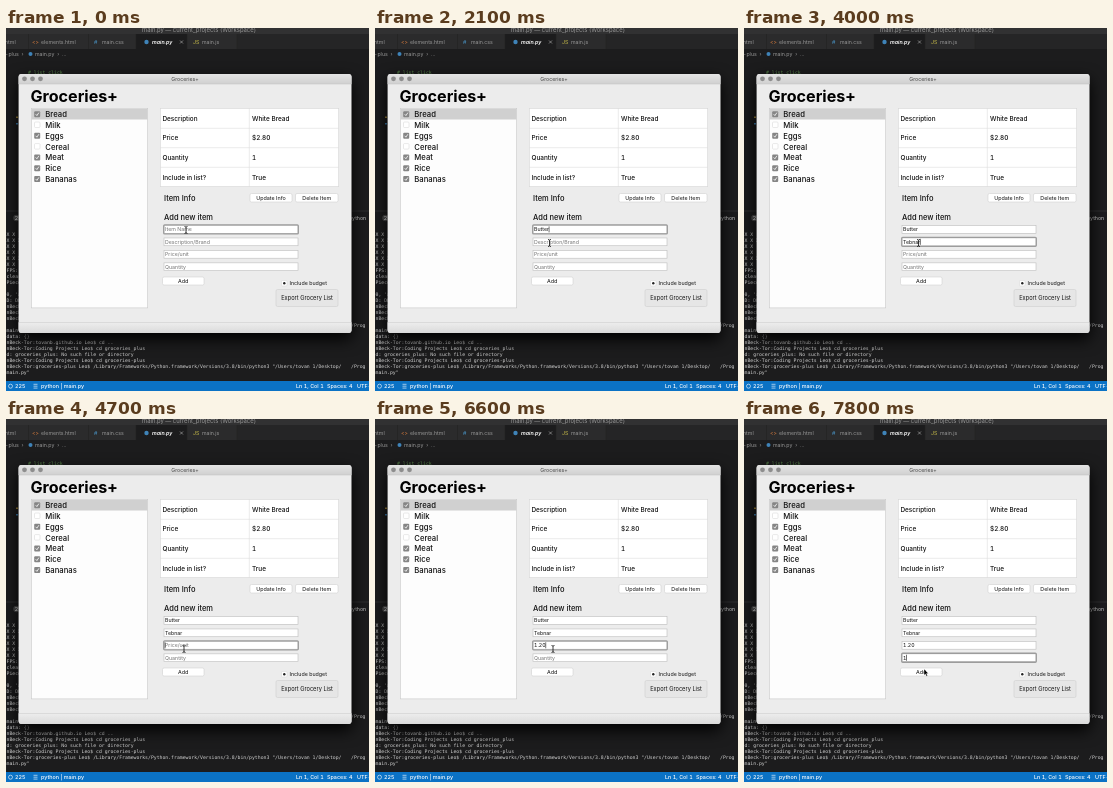
Animation, 363 px wide and 363 px high, one loop 8000 ms. Source, as an HTML page:

```html
<!DOCTYPE html>
<html lang="en">
<head>
<meta charset="utf-8">
<title>Grocery list</title>
<style>
  html, body { margin: 0; width: 100%; height: 100%; overflow: hidden; background: #1c1c1d; }
  svg { display: block; width: 100vw; height: 100vh; }
  text { font-family: Inter, sans-serif; font-size: 5.25px; font-variant-numeric: tabular-nums; fill: #111; white-space: pre; }
  .ui { fill: #969696; }
  .mono { font: 4.8px "DejaVu Sans Mono", monospace; fill: #d0d0d0; }
  .status { font-size: 5.4px; font-weight: 500; fill: #fff; }
  .title { font-size: 16.1px; font-weight: 700; fill: #000; }
  .head { font-size: 7.5px; font-weight: 500; }
  .list { font-size: 7.7px; font-weight: 500; }
  .cell { font-size: 6.4px; font-weight: 500; }
  .mid { text-anchor: middle; }
  .hint { fill: #747474; }
  .shadow { filter: drop-shadow(0 6px 8px #000); }
</style>
</head>
<body>
<svg id="stage" viewBox="0 0 363 363"></svg>
<script>
const text = (x, y, str, cls = '', attrs = '') => `<text x="${x}" y="${y}" class="${cls}" ${attrs}>${str}</text>`;
const rect = (x, y, w, h, fill, attrs = '') => `<rect x="${x}" y="${y}" width="${w}" height="${h}" fill="${fill}" ${attrs}/>`;
const line = (d, stroke, width = 0.6) => `<path d="${d}" stroke="${stroke}" stroke-width="${width}" fill="none"/>`;
const circle = (x, y, r, fill) => `<circle cx="${x}" cy="${y}" r="${r}" fill="${fill}"/>`;
const gradient = (id, top, bottom) => `<linearGradient id="${id}" x2="0" y2="1"><stop stop-color="${top}"/><stop offset="1" stop-color="${bottom}"/></linearGradient>`;

function editor() {
  const terminal = [
    'X X', 'X X X', 'X X', 'X X', 'X X X', 'X X', 'FPS: 6', 'clear', 'Pieces', '',
    "0, 'a'", 'D: DL', 'nBeck-Tor', 'nBeck-Tor', 'nBeck-Tor', '', 'main.py"', 'data: {}',
    'nBeck-Tor:tovanb.github.io Leo$ cd ..',
    'nBeck-Tor:Coding Projects Leo$ cd groceries_plus',
    'd: groceries_plus: No such file or directory',
    'nBeck-Tor:Coding Projects Leo$ cd groceries-plus',
    'nBeck-Tor:groceries-plus Leo$ /Library/Frameworks/Python.framework/Versions/3.8/bin/python3 "/Users/tovan 1/Desktop/',
    'main.py"'
  ];
  return rect(0, 0, 363, 363, '#1c1c1d') + rect(0, 0, 363, 6, '#313132') +
    text(193, 4, 'main.py — current_projects (Workspace)', 'ui mid', 'style="font-size:5.9px"') +
    rect(0, 6, 363, 15, '#252526') + rect(0, 6, 231, 15, '#2b2b2c') + rect(130, 6, 51, 15, '#1c1c1d') +
    line('M22.5 6v15M82.5 6v15M130 6v15M181 6v15M231 6v15', '#222') +
    text(-1, 15.7, 'html', 'ui') +
    text(26, 15.7, '&lt;&gt;', 'ui', 'style="fill:#d67a3c"') + text(35, 15.7, 'elements.html', 'ui') +
    text(88, 15.7, '#', 'ui', 'style="fill:#4b9bd0"') + text(96, 15.7, 'main.css', 'ui') +
    circle(140.5, 14, 2.2, '#3f83b8') +
    text(146, 15.7, 'main.py', 'ui', 'style="fill:#fff;font-style:italic;font-weight:600"') +
    line('M174 12.5l3 3m0-3l-3 3', '#b5b5b5') +
    text(187, 15.7, 'JS', 'ui', 'style="fill:#c9bd49"') + text(196, 15.7, 'main.js', 'ui') +
    text(-1, 28, '-plus  ›', 'ui') + circle(24.5, 26, 2, '#3f83b8') + text(29, 28, 'main.py  ›  ...', 'ui') +
    text(22, 45.5, '# list_click', 'mono', 'style="fill:#5f9150"') +
    rect(10, 88.5, 2, 1.5, '#a88a3a') + rect(10, 95, 2, 1.5, '#3f83b8') +
    line('M0 183H363', '#414141', 0.5) + circle(10.5, 190, 3.2, '#4d4d4d') + text(10.5, 191.9, '2', 'status mid') +
    text(343, 191.8, 'python', 'ui', 'style="fill:#d0d0d0"') +
    terminal.map((s, i) => text(0.5, 207.5 + i * 6, s, 'mono')).join('') +
    text(345, 299, '/Prog', 'mono') + text(345, 339.5, '/Prog', 'mono') +
    rect(0, 353, 363, 10, '#0b72c5') +
    '<circle cx="4.5" cy="358.2" r="2" fill="none" stroke="#fff" stroke-width=".6"/>' +
    text(9, 360.2, '225', 'status') + line('M27.5 356.3h4M27.5 358.2h4M27.5 360.1h4', '#fff') +
    text(35, 360.2, 'python | main.py', 'status') + text(290, 360.2, 'Ln 1, Col 1', 'status') +
    text(321, 360.2, 'Spaces: 4', 'status') + text(351, 360.2, 'UTF-8', 'status');
}

const button = (x, y, w, h, label, size = 5.4, fill = '#fff') =>
  rect(x, y, w, h, fill, 'rx="1.5" stroke="#c8c8c8" stroke-width=".5"') +
  text(x + w / 2, y + h / 2 + 1.9, label, 'mid', `style="font-size:${size}px"`);

function appWindow() {
  const items = ['Bread', 'Milk', 'Eggs', 'Cereal', 'Meat', 'Rice', 'Bananas'];
  const info = [['Description', 'White Bread'], ['Price', '$2.80'], ['Quantity', '1'], ['Include in list?', 'True']];
  const checkbox = (name, y) => /Milk|Cereal/.test(name)
    ? rect(28.5, y, 5.5, 5.5, '#fff', 'rx="1" stroke="#d2d2d2" stroke-width=".5"')
    : rect(28.2, y, 6, 6, '#858585', 'rx="1"') + line(`M29.7 ${y + 3}l1.2 1.4l2-3`, '#fff', 0.8);
  return gradient('bar', '#e4e4e4', '#d0d0d0') + gradient('foot', '#ededed', '#dadada') +
    rect(12.6, 46, 332.9, 259, '#ececec', 'rx="3" class="shadow"') +
    '<path d="M12.6 56v-7q0-3 3-3h326.9q3 0 3 3v7z" fill="url(#bar)"/>' +
    line('M12.6 56H345.5', '#bdbdbd', 0.5) +
    '<path d="M12.6 294.5v7.5q0 3 3 3h326.9q3 0 3-3v-7.5z" fill="url(#foot)"/>' +
    line('M12.6 294.5H345.5', '#c6c6c6', 0.5) +
    [18.5, 26.5, 34.5].map(x => circle(x, 50.8, 2.4, '#8d8d8d')).join('') +
    text(179, 52.6, 'Groceries+', 'mid', 'style="fill:#444"') +
    text(24.5, 74, 'Groceries+', 'title') +
    rect(25.3, 80.3, 116.4, 199.6, '#fdfdfd', 'stroke="#c8c8c8" stroke-width=".6"') +
    rect(25.5, 81, 116, 10.5, '#d0d0d0') +
    items.map((s, i) => checkbox(s, 83.2 + i * 10.8) + text(39.3, 89.2 + i * 10.8, s, 'list')).join('') +
    rect(154.3, 80.3, 178.4, 78.4, '#fff', 'stroke="#d6d6d6" stroke-width=".6"') +
    line('M154 100.3H333M154 119.7H333M154 139.3H333M243.3 80V159', '#dedede') +
    info.map(([k, v], i) => text(156.5, 92.7 + i * 19.6, k, 'cell') + text(246, 92.7 + i * 19.6, v, 'cell')).join('') +
    text(158, 173, 'Item Info', 'head') + text(158, 191.5, 'Add new item', 'head') +
    button(244, 165.5, 42, 8.5, 'Update Info') + button(289.5, 165.5, 42.5, 8.5, 'Delete Item') +
    button(156.5, 249, 41.5, 8, 'Add') + button(270, 261.5, 62, 17, 'Export Grocery List', 5.7, '#e6e6e6') +
    rect(275.5, 252.5, 5.5, 5.5, '#fff', 'rx="1" stroke="#ccc" stroke-width=".4"') + circle(278.3, 255.2, 1.2, '#222') +
    text(283.5, 257, 'Include budget', '', 'style="font-size:5.3px"');
}

// Each field: hint, typed value, focus time and one time per keystroke.
const fields = [
  { hint: 'Item Name', value: 'Butter', focus: 0, keys: [500, 900, 1100, 1200, 1500, 1600] },
  { hint: 'Description/Brand', value: 'Tebnar', focus: 2300, keys: [2800, 3000, 3500, 3700, 3800, 4000] },
  { hint: 'Price/unit', value: '1.20', focus: 4600, keys: [5600, 5700, 6300, 6500] },
  { hint: 'Quantity', value: '1', focus: 7300, keys: [7600] }
];
const caretOff = [[0, 400], [5300, 5500], [6900, 7300]];
// Pointer moves: start, end, x, y
const moves = [[1700, 2100, 174.5, 215], [4300, 4600, 178, 230], [6900, 7100, 180, 241], [7600, 7800, 180, 250]];
const fieldY = i => 201.4 + i * 12.45;

const stage = document.getElementById('stage');
stage.innerHTML = editor() + appWindow() +
  fields.map((f, i) => rect(158, fieldY(i) - 3.9, 134, 7.8, '#fff', 'stroke="#bdbdbd" stroke-width=".6"')).join('') +
  '<rect id="ring" x="157.7" width="134.6" height="9" rx="1" fill="none" stroke="#9c9c9c" stroke-width="1.3"/>' +
  fields.map((f, i) => text(159, fieldY(i) + 1.9, '', '', `id="field${i}"`)).join('') +
  '<path id="caret" d="M0-3V3" stroke="#111" stroke-width=".6"/>' +
  '<path id="beam" d="M-1.5-3.5Q0-3.5 0-2.5Q0-3.5 1.5-3.5M0-2.5V2.8M-1.5 3.5Q0 3.5 0 2.5Q0 3.5 1.5 3.5" fill="none" stroke="#111" stroke-width=".8"/>' +
  '<path id="arrow" d="M0 0V6.2L1.4 5L2.4 7.2L3.5 6.7L2.5 4.6L4.4 4.5Z" fill="#000" stroke="#fff" stroke-width=".4"/>';
const get = id => document.getElementById(id);
const labels = fields.map((f, i) => get('field' + i));
const place = (el, x, y) => el.setAttribute('transform', `translate(${x} ${y})`);
const show = (el, on) => el.setAttribute('visibility', on ? 'visible' : 'hidden');

function draw(t) {
  let active = 0;
  fields.forEach((f, i) => {
    if (t >= f.focus) active = i;
    const typed = f.value.slice(0, f.keys.filter(k => t >= k).length);
    labels[i].textContent = typed || f.hint;
    labels[i].setAttribute('class', typed ? '' : 'hint');
  });
  const label = labels[active];
  const width = label.classList.contains('hint') ? 0 : label.getComputedTextLength();
  get('ring').setAttribute('y', fieldY(active) - 4.5);
  place(get('caret'), 159.1 + width, fieldY(active));
  show(get('caret'), !caretOff.some(([from, to]) => t >= from && t < to));

  let x = 180, y = 202;
  for (const [from, to, toX, toY] of moves) {
    const p = Math.min(1, Math.max(0, (t - from) / (to - from)));
    const eased = p * p * (3 - 2 * p);
    x += (toX - x) * eased;
    y += (toY - y) * eased;
  }
  const overButton = y > 247;
  place(get('beam'), x, y);
  place(get('arrow'), x, y);
  show(get('beam'), !overButton);
  show(get('arrow'), overButton);
}

function tick() {
  draw(Math.floor(performance.now() % 8000 / 100) * 100);
  requestAnimationFrame(tick);
}
tick();
</script>
</body>
</html>
```
